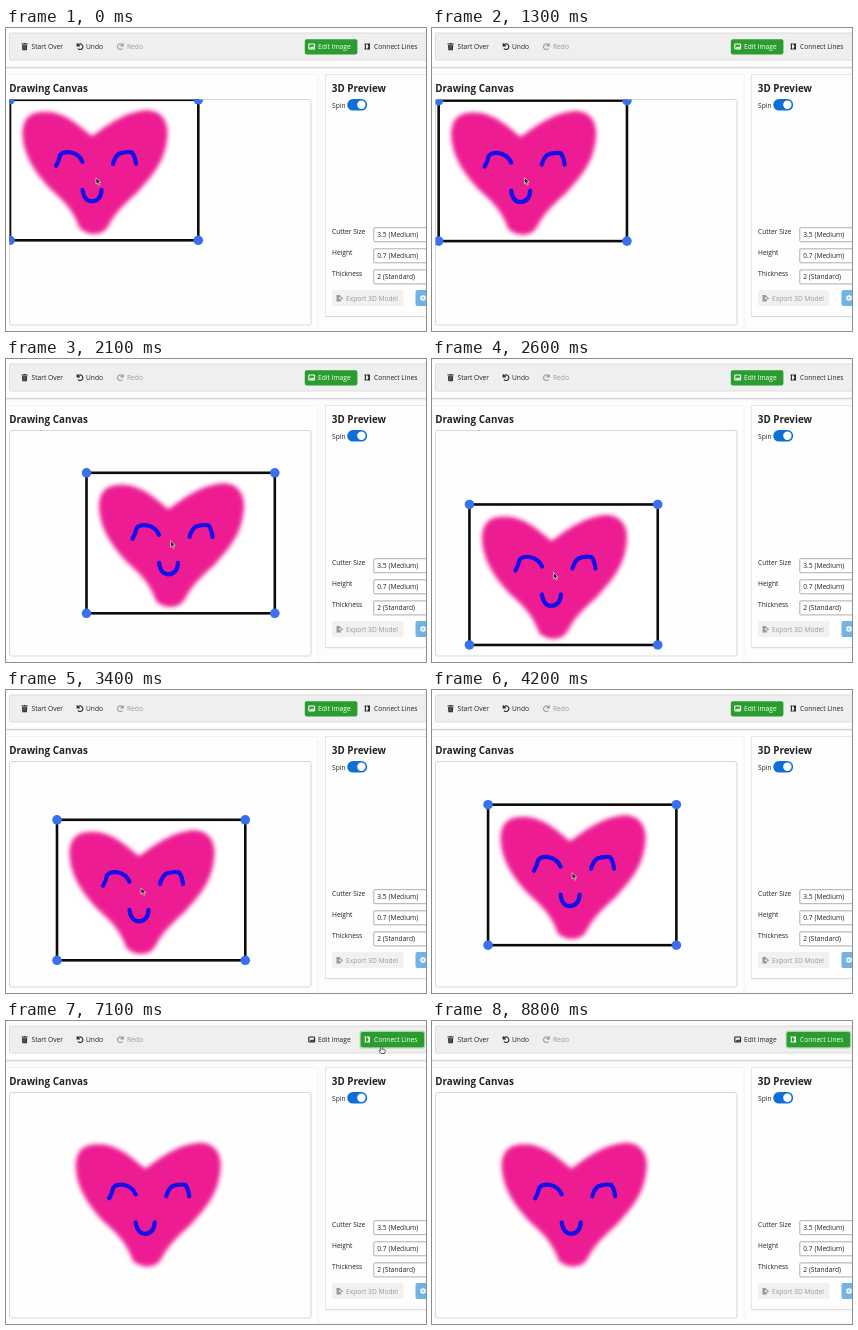
An HTML page that plays this animation: 420x303 px, repeating every 8.9 s.

```html
<!DOCTYPE html>
<html lang="en">
<head>
<meta charset="utf-8">
<title>Drawing Canvas</title>
<style>
html, body { margin: 0; width: 100%; height: 100%; overflow: hidden; background: #fdfdfd; }
svg { display: block; width: 100vw; height: 100vh; }
text { font: 6.67px "Open Sans", sans-serif; fill: #222; }
.title { font-size: 9.85px; font-weight: 700; }
.off { fill: #999; }
.icon { fill: none; stroke: currentColor; stroke-width: 1.1; }
.select { fill: #fff; stroke: #999; stroke-width: .8; }
</style>
</head>
<body>
<svg viewBox="0 0 420 303">
  <defs>
    <filter id="soft" x="-10%" y="-10%" width="120%" height="120%"><feGaussianBlur stdDeviation="2"/></filter>
    <filter id="ink" x="-10%" y="-10%" width="120%" height="120%"><feGaussianBlur stdDeviation=".5"/></filter>
    <clipPath id="area"><rect x="3.5" y="71.5" width="301" height="225"/></clipPath>
  </defs>
  <rect width="420" height="303" fill="#fdfdfd"/>

  <!-- toolbar -->
  <rect x="3.5" y="5" width="430" height="27" rx="1" fill="#efefef" stroke="#d6d6d6" stroke-width=".8"/>
  <rect y="38.8" width="420" height="1.2" fill="#d4d4d4"/>
  <rect y="40" width="420" height="1.2" fill="#f0f0f0"/>
  <path d="M15.5 15.6h2l.4-.7h1.4l.4.7h2v1h-6.2zM16 17.2h5.2l-.4 5h-4.4z" fill="#222"/>
  <path d="M17.6 18v3.5M18.6 18v3.5M19.6 18v3.5" stroke="#aaa" stroke-width=".4"/>
  <text x="25.5" y="21.2">Start Over</text>
  <path id="turn" class="icon" color="#222" d="M71.2 15.3v2.6h2.7M71.5 17.6a2.8 2.8 0 1 1 .4 2.9"/>
  <text x="80" y="21.2">Undo</text>
  <path class="icon" color="#999" d="M117.2 15.3v2.6h-2.7M116.9 17.6a2.8 2.8 0 1 0-.4 2.9"/>
  <text class="off" x="121" y="21.2">Redo</text>

  <g id="edit">
    <rect class="bg" x="298.8" y="11.2" width="52.6" height="15.2" rx="1.8"/>
    <rect class="icon" x="302.8" y="16" width="5.8" height="5" rx=".6"/>
    <path d="M303.5 20.5l1.6-2 1 1 1-1.5 1.2 2.5z" fill="currentColor"/>
    <text x="312" y="21.2">Edit Image</text>
  </g>
  <g id="connect">
    <rect id="ring" x="353.6" y="9.8" width="65.6" height="17.6" rx="2.5" fill="#a9d8ab"/>
    <rect class="bg" x="354.7" y="11" width="63.4" height="15.2" rx="1.8"/>
    <path class="icon" d="M358.5 16h2.2M358.5 21h2.2M359.4 16v5M364 16h-2.2l1.4 2.5-1.4 2.500h2.200M363.400 16v5"/>
    <text x="368" y="21.2">Connect Lines</text>
  </g>

  <!-- drawing panel -->
  <rect x="-5" y="46.5" width="317" height="270" fill="#fefefe" stroke="#f1f1f1" stroke-width=".8"/>
  <text class="title" x="3.2" y="63.7">Drawing Canvas</text>
  <rect x="3.5" y="71.5" width="301.5" height="225.5" rx="2" fill="#fefefe" stroke="#d2d2d2" stroke-width=".9"/>
  <g clip-path="url(#area)">
    <g id="art">
      <rect class="frame" width="188.3" height="140.5" fill="#fff" stroke="#0b0b0b" stroke-width="2.6"/>
      <path fill="#ed1a92" filter="url(#soft)" d="M12.500 34C13 18 20 12.500 34 12C54 11.500 68 25 82 36.500C98 25 114 12.500 136 10.500
        C152 10.500 158 22 157.500 34C156 62 142 76 128 92C114 105 106 112 99 125C94 136 80 137 70 129
        C62 108 54 102 40 89C24 72 13 54 12.500 34Z"/>
      <g fill="none" stroke="#1510ea" stroke-width="4.2" stroke-linecap="round" stroke-linejoin="round" filter="url(#ink)">
        <path d="M46 66Q49 61 50 55.500Q53 51.500 60 52.500Q69 54 72.500 62"/>
        <path d="M103 64Q105 57 109 54Q115 51.500 122 52.500Q125 56 126 64"/>
        <path d="M72.500 90Q74 101 81.500 101.500Q91 101 91.500 90"/>
      </g>
      <g class="frame" id="handles" fill="#3a70ec"></g>
    </g>
  </g>

  <!-- preview panel -->
  <rect x="319.5" y="46.5" width="120" height="242" fill="#fefefe" stroke="#e4e4e4" stroke-width=".9"/>
  <rect x="319.5" y="288" width="101" height="1.2" fill="#dcdcdc"/>
  <text class="title" x="325.8" y="63.7">3D Preview</text>
  <text x="326" y="80">Spin</text>
  <rect x="341.2" y="71" width="20" height="11.6" rx="5.8" fill="#0e6fd6"/>
  <circle cx="355.4" cy="76.8" r="4.2" fill="#fff"/>
  <g id="options"></g>
  <rect x="326" y="262" width="71.5" height="16" rx="2" fill="#f1f1f1"/>
  <path class="off" d="M330.5 267h3l1.3 1.3v1.2h-2v1.6h2v2.4h-4.3zM335 268.8l2.3 1.5-2.3 1.5z"/>
  <text class="off" x="340" y="272.6">Export 3D Model</text>
  <rect x="409.5" y="262" width="20" height="16" rx="2" fill="#72b3e6"/>
  <circle cx="417" cy="270" r="2.8" fill="#fff"/>
  <path d="M417 268.6v2.8M415.6 270h2.8" stroke="#72b3e6" stroke-width=".8"/>

  <g id="pointer" stroke-linejoin="round">
    <path id="arrow" d="M0 0v6.3l1.5-1.3 1.1 2.5 1.2-.5-1.1-2.4h2z" fill="#111" stroke="#fff" stroke-width=".6"/>
    <path id="hand" d="M-.8 .7Q0-.6 .7 .7V2.6L3.3 3.2Q4 3.5 3.8 4.6L3.1 7H-.6L-2.5 4.3Q-2.6 3.3-1.5 3.7L-.8 4.2Z" fill="#fff" stroke="#222" stroke-width=".7"/>
  </g>
</svg>
<script>
const NS = "http://www.w3.org/2000/svg";
const LOOP = 8900, STEP = 100;
const GRAB = 1200, REACH = 5000, HOVER = 5600, CLICK = 6800, LEAVE = 7600;
const $ = id => document.getElementById(id);

function add(parent, name, attrs, text) {
  const el = document.createElementNS(NS, name);
  for (const key in attrs) el.setAttribute(key, attrs[key]);
  if (text) el.textContent = text;
  parent.append(el);
}

for (const cx of [0, 188.3])
  for (const cy of [0, 140.5]) add($("handles"), "circle", { cx, cy, r: 4.8 });

[["Cutter Size", "3.5 (Medium)"], ["Height", "0.7 (Medium)"], ["Thickness", "2 (Standard)"]]
  .forEach(([label, value], i) => {
    const y = 206 + i * 21.1;
    add($("options"), "text", { x: 326, y }, label);
    add($("options"), "rect", { class: "select", x: 367.8, y: y - 6.3, width: 60, height: 14, rx: 1 });
    add($("options"), "text", { x: 371.3, y: y + 3.2 }, value);
  });

// Eased progress from one time to another
function ease(t, from, to) {
  const u = Math.min(1, Math.max(0, (t - from) / (to - from)));
  return u * u * (3 - 2 * u);
}
const mix = (a, b, u) => a.map((v, i) => v + (b[i] - v) * u);

// Where the drag rests or turns
const drag = [
  { at: GRAB, pos: [4, 71.8] },
  { at: 1700, pos: [29.5, 79.5] },
  { at: 2100, pos: [80.5, 113.8] },
  { at: 2700, pos: [34, 148] },
  { at: 3400, pos: [51, 129.8] },
  { at: 4500, pos: [57.2, 111.3] }
];

function artAt(t) {
  return drag.slice(1).reduce(
    (pos, stop, i) => mix(pos, stop.pos, ease(t, drag[i].at, stop.at)),
    drag[0].pos
  );
}

function pointerAt(t) {
  const hold = mix([86, 78], [84, 68], ease(t, GRAB, 1700));
  const held = artAt(t).map((v, i) => v + hold[i]);
  return mix(held, [375.5, 25.5], ease(t, REACH, HOVER));
}

function show(el, on) { el.style.display = on ? "" : "none"; }

function paintButton(id, active, hover) {
  const el = $(id), ink = active ? "#fff" : "#222";
  el.style.color = ink;
  el.querySelector("text").style.fill = ink;
  el.querySelector(".bg").setAttribute("fill", active ? "#2a9d2e" : hover ? "#c5c5c5" : "#efefef");
}

function draw(t) {
  const hover = t >= HOVER, linking = t >= CLICK;

  $("art").setAttribute("transform", `translate(${artAt(t)})`);
  document.querySelectorAll(".frame").forEach(el => show(el, !linking));
  paintButton("edit", !linking, false);
  paintButton("connect", linking, hover);
  show($("ring"), linking);

  $("pointer").setAttribute("transform", `translate(${pointerAt(t)})`);
  show($("pointer"), t < LEAVE);
  show($("arrow"), !hover);
  show($("hand"), hover);
}

const start = performance.now();
function tick() {
  const t = (performance.now() - start) % LOOP;
  draw(Math.floor(t / STEP) * STEP);
  requestAnimationFrame(tick);
}
tick();
</script>
</body>
</html>
```
